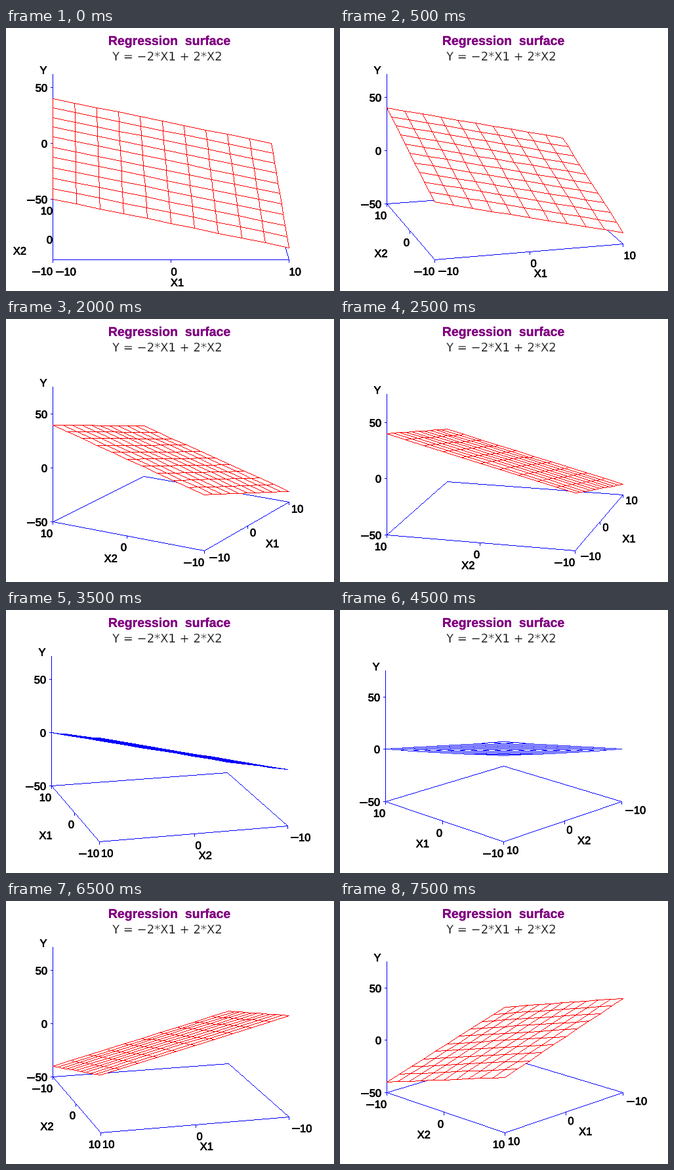
These frames come from a looping animation (500x400 px, 8 s). A matplotlib script:

```python
import numpy as np
import matplotlib.pyplot as plt
from matplotlib.animation import FuncAnimation
from matplotlib.patheffects import Normal, Stroke

W, H, DPI = 500, 400, 100
PX = 72 / DPI
FRAMES, STEP_MS, STEP_DEG = 16, 500, 15

FRONT_Y, SPAN = 352, 360           # screen row of the nearest corner, plot width
DEPTH, RISE, SHRINK = 0.276, 0.01022, 0.0405
Y_MIN, Y_LEN, BOX_H, AXIS_TOP = -50, 125, 304.5, 70
CELLS = 10
RED, BLUE, WHITE = (255, 0, 0), (0, 0, 255), (255, 255, 255)

fig = plt.figure(figsize=(W / DPI, H / DPI), dpi=DPI, facecolor="white")
ax = fig.add_axes([0, 0, 1, 1])


def pixel(p):
    return np.round(p).astype(int)


def line(canvas, color, *points):
    """Hard one-pixel polyline."""
    for p, q in zip(points, points[1:]):
        n = np.abs(np.subtract(q, p)).max() + 1
        x, y = pixel(np.linspace(p, q, n)).T
        canvas[y, x] = color


def fill(canvas, color, corners):
    """Convex polygon, either winding."""
    y, x = np.mgrid[:H, :W]
    sides = [(q[0] - p[0]) * (y - p[1]) - (q[1] - p[1]) * (x - p[0])
             for p, q in zip(corners, corners[1:] + corners[:1])]
    canvas[(np.min(sides, axis=0) >= 0) | (np.max(sides, axis=0) <= 0)] = color


def text(x, y, s, ha="center", size=16.5, color="black", family="Liberation Sans",
         weight="normal", edge="black", edge_width=0.7):
    """Text whose capitals are centred on row y; a white edge makes it thinner."""
    outline = Stroke(linewidth=edge_width * PX, foreground=edge)
    return ax.text(x, y + 0.35 * size, s, ha=ha, va="baseline", color=color,
                   family=family, weight=weight, size=size * PX,
                   path_effects=[Normal(), outline])


def number(x, y, n, ha):
    """Axis value with a long, heavy minus."""
    dash = 12.5 if n < 0 else 0
    label = text(x + (dash if ha == "left" else 0), y, str(abs(n)), ha)
    if dash:
        start = label.get_window_extent().x0 - dash
        ax.plot([start, start + 12], [y + 0.5, y + 0.5], color="black",
                lw=2 * PX, solid_capstyle="butt")


def titles():
    text(249, 19, "Regression  surface", size=19.5, color="purple",
         weight="bold", edge="purple", edge_width=0.2)
    text(246, 43, "Y = \u22122*X1 + 2*X2", size=18, family="DejaVu Sans",
         edge="white", edge_width=0.5)


class View:
    """Perspective seen from the nearest corner; u runs right, v runs left."""

    def __init__(self, angle):
        self.quad = max(0, -(-angle // 90) - 1)
        self.turn = angle - 90 * self.quad
        t = np.radians(self.turn)
        self.cos, self.sin = np.cos(t), np.sin(t)
        self.left = 69 if self.quad == 1 else 71
        near, far = self.flat(0, 1)[0], self.flat(1, 0)[0]
        self.kx = SPAN / (far - near)
        self.x0 = self.left - near * self.kx
        _, depth, s = self.flat(1, 1)
        self.ky = BOX_H / (s * (DEPTH * depth + RISE * Y_LEN))

    def flat(self, u, v):
        depth = 2 * (u * self.sin + v * self.cos)
        s = 1 / (1 + SHRINK * depth)
        return 2 * (u * self.cos - v * self.sin) * s, depth, s

    def point(self, u, v, y=Y_MIN):
        x, depth, s = self.flat(u, v)
        rise = self.ky * s * (DEPTH * depth + RISE * (y - Y_MIN))
        return np.array([self.x0 + self.kx * x, FRONT_Y - rise])

    def data(self, u, v):
        a, b = 20 * u - 10, 20 * v - 10
        return [(a, b), (b, -a), (-a, -b)][self.quad]


def surface(canvas, view):
    def node(i, j):
        u, v = i / CELLS, j / CELLS
        x1, x2 = view.data(u, v)
        return pixel(view.point(u, v, -2 * x1 + 2 * x2))

    def quad(i, j, n):
        return [node(i, j), node(i + n, j), node(i + n, j + n), node(i, j + n)]

    fill(canvas, WHITE, quad(0, 0, CELLS))
    for i, j in sorted(np.ndindex(CELLS, CELLS), key=lambda c: -view.flat(*c)[1]):
        q = quad(i, j, 1)
        p, r = q[2] - q[0], q[3] - q[1]
        below = p[0] * r[1] - p[1] * r[0] > 0
        line(canvas, BLUE if below else RED, *q, q[0])


def axes(canvas, view):
    front, right, back, left = (pixel(view.point(u, v))
                                for u, v in ((0, 0), (1, 0), (1, 1), (0, 1)))
    top = max(AXIS_TOP, round(view.point(0, 1, Y_MIN + Y_LEN)[1]))
    line(canvas, BLUE, front, right, back, left, front)
    line(canvas, BLUE, left, (left[0], top))

    for y in (-50, 0, 50):
        p = pixel(view.point(0, 1, y))
        line(canvas, BLUE, p, p - (3, 0))
        number(p[0] - 8, p[1] + 1, y, "right")
    text(view.left - 14, top - 6, "Y")

    ir, il = (1, 0) if view.quad == 1 else (0, 1)
    drop = 8 + 10.5 * view.cos ** 2
    for w in (0, 0.5, 1):
        r, l = pixel(view.point(w, 0)), pixel(view.point(0, w))
        n = int(view.data(w, 0)[ir])
        shift = 4 * view.sin + (3 if n < 0 else 0) + (1.5 if w == 0 else 0)
        number(r[0] + shift + 0.5, r[1] + drop, n, "left")
        number(l[0], l[1] + 18, int(view.data(0, w)[il]), "right")
        line(canvas, BLUE, r, r + (0, 4))
        line(canvas, BLUE, l, l + (0, 4))

    mid_r, mid_l, t = view.point(0.5, 0), view.point(0, 0.5), view.turn
    text(mid_r[0] + 10 + 0.46 * t, mid_r[1] + 35 - 0.12 * t, f"X{ir + 1}")
    text(mid_l[0] - 50 + 0.43 * t, mid_l[1] + 34.5, f"X{il + 1}")


def draw(frame):
    ax.clear()
    ax.axis("off")
    ax.set(xlim=(0, W), ylim=(H, 0))
    canvas = np.full((H, W, 3), 255, dtype=np.uint8)
    view = View(frame * STEP_DEG)
    titles()
    axes(canvas, view)
    surface(canvas, view)
    ax.imshow(canvas, extent=(0, W, H, 0), aspect="auto", interpolation="nearest")
    ax.set(xlim=(0, W), ylim=(H, 0))
    return []


anim = FuncAnimation(fig, draw, frames=FRAMES, interval=STEP_MS,
                     init_func=lambda: [], repeat=True, repeat_delay=0)
plt.show()
```
